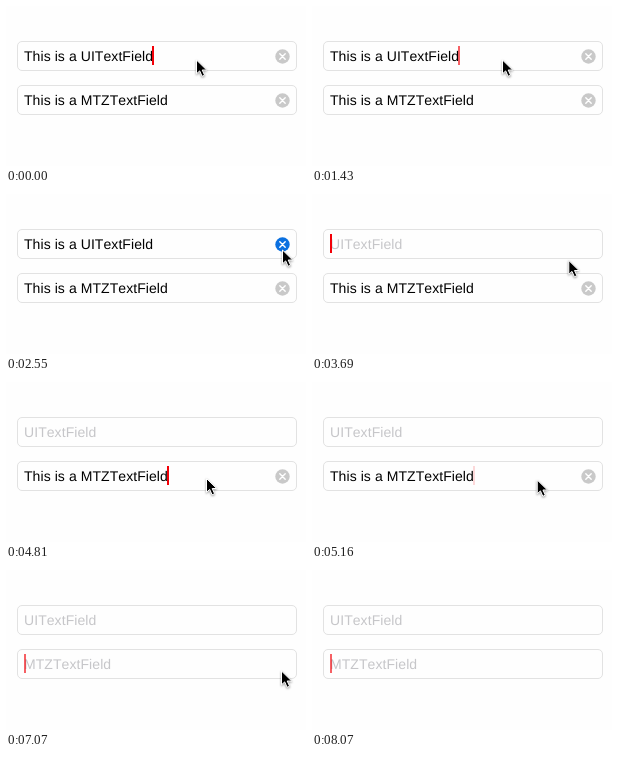
An HTML page for the animation above (8.11 s loop, 300 by 160 pixels).

```html
<!DOCTYPE html>
<html lang="en">
<head>
<meta charset="utf-8">
<title>Text fields</title>
<style>
  html, body { margin: 0; width: 100%; height: 100%; overflow: hidden; background: #fefefe; }
  svg { display: block; width: 300px; height: 160px; }
  text {
    font: 14px "Liberation Sans", Arial, sans-serif; font-kerning: none; white-space: pre;
    letter-spacing: .07px; text-rendering: geometricPrecision;
  }
  .box { fill: #fefefe; stroke: #e2e2e2; }
  .caret { fill: #f20008; }
  .cross { stroke: #fff; stroke-width: 1.4; stroke-linecap: round; }
  #pointer { filter: drop-shadow(0 1px 0.8px rgba(0, 0, 0, .4)); }
</style>
</head>
<body>
<svg viewBox="0 0 300 160">
  <g id="fields"></g>
  <g id="pointer">
    <path d="M.5 1V14.8L3.7 11.9L6.1 17.3L8.6 16.2L6.2 11H10.7Z" fill="#000" stroke="#fff"/>
  </g>
</svg>
<script>
const LOOP = 8110, STEP = 60;
const GREY = '#c9c9c9', BLUE = '#0a70e0', RED = '#fa000a';

const fields = [
  { y: 35, name: 'UITextField', end: 146, press: 2490, clear: 3150, hot: BLUE },
  { y: 79, name: 'MTZTextField', end: 161, press: 5700, clear: 6290, hot: RED }
];

// Caret blinking: start time and direction of each fade.
const blinks = [
  [420, 'out'], [900, 'in'], [1430, 'out'], [1910, 'in'], [2370, 'out'], [2850, 'in'],
  [3150, 'on'], [3860, 'out'], [4340, 'in'], [4460, 'on'], [4990, 'out'], [5470, 'in'],
  [6000, 'out'], [6290, 'on'], [7070, 'out'], [7550, 'in'], [8070, 'out']
];
const fades = { out: [.62, .38, .15, 0], in: [.5, 1], on: [1] };
const FOCUS_SWITCH = 4460;

// Pointer moves: first step, last step, destination.
const home = [190, 53];
const moves = [
  [1490, 2130, 276, 55],
  [3570, 4040, 200, 95.5],
  [4870, 5580, 275, 100],
  [7130, 7710, 275, 162]
];

const pointer = document.getElementById('pointer');
const root = document.getElementById('fields');

for (const f of fields) {
  const g = document.createElementNS('http://www.w3.org/2000/svg', 'g');
  g.setAttribute('transform', `translate(0 ${f.y})`);
  g.innerHTML = `<rect class="box" x="11.5" y=".5" width="279" height="29" rx="4.5"/>
    <text x="18" y="20"></text>
    <g class="button"><circle cx="276.5" cy="15.5" r="7.2"/>
    <path class="cross" d="M273.8 12.8l5.4 5.4m0-5.4l-5.4 5.4"/></g>
    <rect class="caret" y="5" width="2" height="19"/>`;
  root.append(g);
  f.text = g.querySelector('text');
  f.button = g.querySelector('.button');
  f.disc = g.querySelector('circle');
  f.caret = g.querySelector('.caret');
}

function caretAlpha(t) {
  let alpha = 1;
  for (const [start, kind] of blinks) {
    if (t < start) break;
    const levels = fades[kind];
    alpha = levels[Math.min(levels.length - 1, Math.floor((t - start) / STEP))];
  }
  return alpha;
}

function pointerAt(t) {
  let [x, y] = home;
  for (const [start, end, toX, toY] of moves) {
    if (t < start) break;
    const n = Math.round((end - start) / STEP);
    const k = Math.min(n, Math.floor((t - start) / (end - start) * n));
    const p = (k + 1) / (n + 1);
    const e = p * p * (3 - 2 * p);
    x += (toX - x) * e;
    y += (toY - y) * e;
  }
  return [x, y];
}

function draw(t) {
  const active = t < FOCUS_SWITCH ? 0 : 1;
  const alpha = caretAlpha(t);
  fields.forEach((f, i) => {
    const empty = t >= f.clear;
    f.text.textContent = empty ? f.name : 'This is a ' + f.name;
    f.text.setAttribute('fill', empty ? '#c6c6c9' : '#000');
    f.button.setAttribute('visibility', empty ? 'hidden' : 'visible');
    f.disc.setAttribute('fill', t >= f.press ? f.hot : GREY);
    f.caret.setAttribute('x', empty ? 18 : f.end);
    f.caret.setAttribute('opacity', i === active ? alpha : 0);
  });
  pointer.setAttribute('transform', `translate(${pointerAt(t)})`);
}

const begin = performance.now();
function tick() {
  draw((performance.now() - begin) % LOOP);
  requestAnimationFrame(tick);
}
tick();
</script>
</body>
</html>
```
